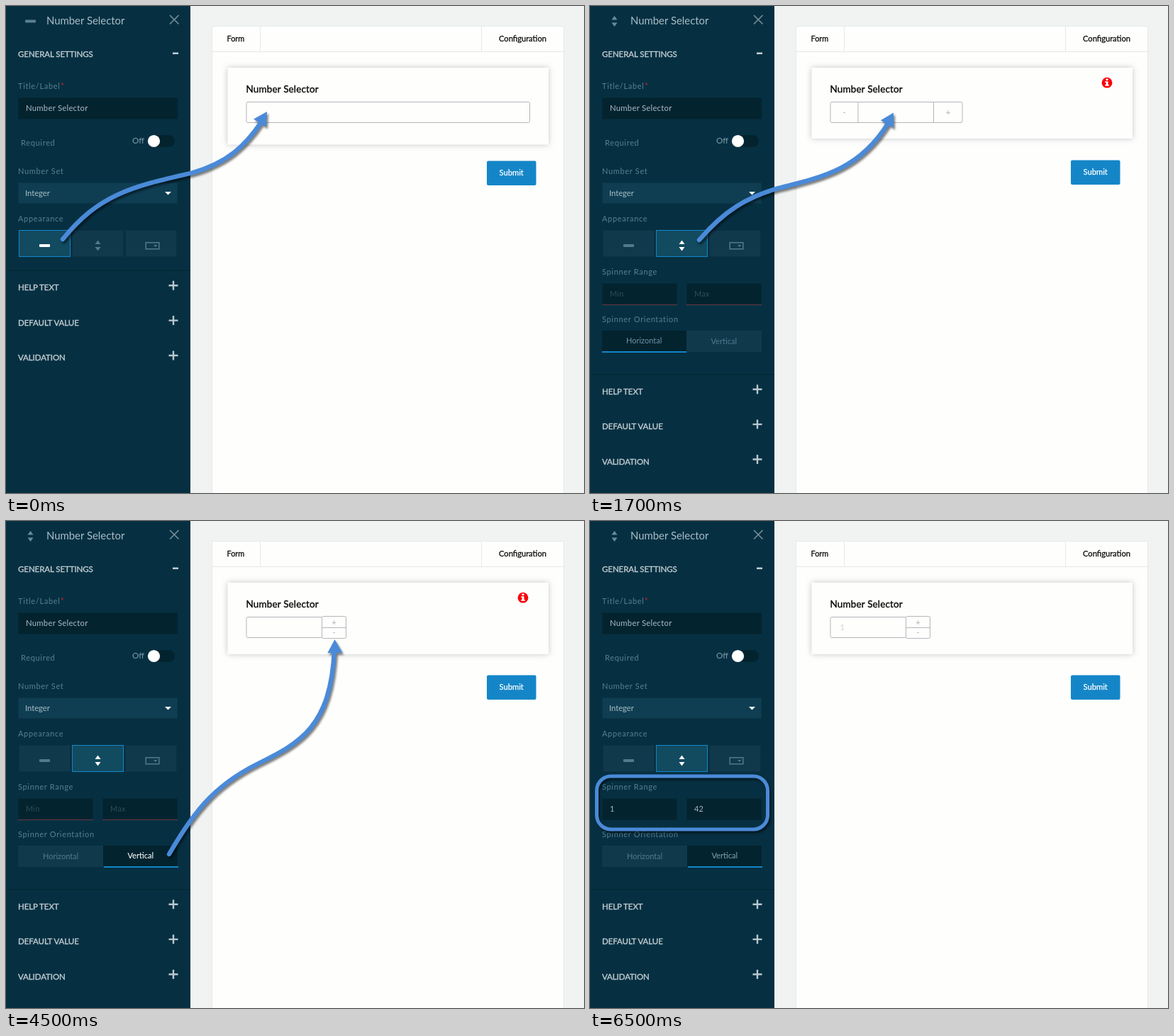
An HTML page that plays this animation: 815x687 px, repeating every 8 s.

```html
<!DOCTYPE html>
<html lang="en">
<head>
<meta charset="utf-8">
<title>Number Selector settings</title>
<style>
  html, body { margin: 0; width: 100%; height: 100%; overflow: hidden; background: #f0f3f2; }
  svg { display: block; }
  text { font-family: Lato, "Open Sans", sans-serif; white-space: pre; }
  .mark { fill: none; stroke: #4a8ad8; stroke-width: 6.4; stroke-linecap: round;
          filter: drop-shadow(2.5px 3px 1.5px rgba(0, 0, 0, .5)); }
  .mark polygon { fill: #4a8ad8; stroke: none; }
  .card { filter: drop-shadow(0 0 4px rgba(40, 60, 55, .28)); }
</style>
</head>
<body>
<svg id="stage" width="815" height="687" viewBox="0 0 815 687"></svg>
<script>
const DARK = '#03232f', SOFT = '#11394c', BLUE = '#1486c8', LABEL = '#587f91', GREY = '#b3b6b8';

const rect = (x, y, w, h, fill, more = '') =>
  `<rect x="${x}" y="${y}" width="${w}" height="${h}" fill="${fill}" ${more}/>`;
const box = (x, y, w, h, fill, line, r = 0) => rect(x, y, w, h, fill, `rx="${r}" stroke="${line}"`);
const path = (d, line, width = 1) => `<path d="${d}" fill="none" stroke="${line}" stroke-width="${width}"/>`;
const text = (x, y, s, size, fill, gap = 0, weight = 0, anchor = 'start') =>
  `<text x="${x}" y="${y}" font-size="${size}" fill="${fill}" letter-spacing="${gap}" text-anchor="${anchor}"` +
  ` stroke="${fill}" stroke-width="${weight}">${s}</text>`;
const label = (x, y, s) => text(x, y, s, 11, LABEL, .68);
const heading = (y, s) => text(17, y, s, 11.5, '#c3ced3', -.08, .35);
const triangle = (x, y, w, h, fill) => `<path d="M${x - w / 2} ${y}h${w}l${-w / 2} ${h}z" fill="${fill}"/>`;
const spinner = (x, y, fill) => triangle(x, y - 2, 8, -5.5, fill) + triangle(x, y + 2, 8, 5.5, fill);
const dash = (x, y, fill) => rect(x - 7.5, y - 2, 15, 4, fill, 'rx=".8"');
const plus = (x, y) => path(`M${x - 6.5} ${y}h13M${x} ${y - 6.5}v13`, '#b9c7ce', 2.4);
const sign = (x, y, s, size) => text(x, y, s, size, '#a9adb0', 0, 0, 'middle');

// Arrow head with its tip at x, y and its base centre dx, dy behind it
function head(x, y, dx, dy) {
  const k = 10.5 / Math.hypot(dx, dy), bx = x + dx, by = y + dy;
  return `<polygon points="${x},${y} ${bx - dy * k},${by + dx * k} ${bx + dy * k},${by - dx * k}"/>`;
}
const mark = (d, ...heads) => `<g class="mark"><path d="${d}"/>${heads.map(h => head(...h)).join('')}</g>`;

function appearance(active) {
  return [18, 93, 168].map((x, i) => {
    const on = i === active, ink = on ? '#fff' : '#527a8c';
    const icon = [
      dash(54.5, 338, ink),
      spinner(129.5, 338, ink),
      path('M197.2 333.7h18.6v9.1h-18.6z', ink, 1.5) + triangle(210.8, 337, 5, 3, ink)
    ][i];
    return box(x + .5, 316.5, 72, 37, on ? '#124a60' : SOFT, on ? BLUE : '#0c3143') + icon;
  }).join('');
}

function rangeField(x, hint, value) {
  return box(x + .5, 391.5, 105, 30, DARK, '#052836', 1) +
    (value ? '' : path(`M${x} 421.5h106`, '#6a3a42')) +
    text(x + 11, 410, value || hint, 11, value ? '#a3b8c1' : '#2f4c59', .2);
}

function orientation(vertical, ink) {
  const split = vertical ? 137 : 136, x = vertical ? 138 : 17, w = vertical ? 105 : 119;
  return rect(17, 458, split - 17, 30, vertical ? SOFT : DARK) +
    rect(split, 458, 242 - split, 30, vertical ? DARK : SOFT) +
    rect(x, 487, w, 2, BLUE) +
    text(vertical ? 52 : 51, vertical ? 476.5 : 475.5, 'Horizontal', 11, vertical ? '#507b8e' : '#6c94a6') +
    text(vertical ? 171.5 : 170.5, vertical ? 475.5 : 476.5, 'Vertical', 11, ink, 0, vertical ? .1 : 0);
}

function panel(s) {
  const shift = s.spin ? 146.5 : 0;
  return rect(0, 0, 260, 687, '#063042') +
    (s.spin ? spinner(34.5, 21.5, '#6b8b99') : dash(34.5, 21.5, '#5d8090')) +
    text(57, 26, 'Number Selector', 14.9, '#a9bdc6') +
    path('M231 13l12.5 12.5M243.5 13l-12.5 12.5', '#768d98', 1.7) +
    heading(71.5, 'GENERAL SETTINGS') + rect(235, 65.5, 8, 2.5, '#c3ced3') +
    label(17, 117, 'Title/Label') + text(77, 117, '*', 11, '#d8222c') +
    box(17.5, 129.5, 224.5, 30, DARK, '#052836', 1) +
    text(28, 148, 'Number Selector', 11.3, '#a9bdc6', .25) +
    label(21, 197, 'Required') + text(178, 194, 'Off', 11.6, '#7f9eac') +
    rect(200, 182, 38, 17, DARK, 'rx="8.5"') + '<circle cx="208.5" cy="190.5" r="8.6" fill="#fff"/>' +
    label(17, 236.5, 'Number Set') +
    box(17.5, 249.5, 224, 29, '#0f3e53', '#0b3548') +
    text(27, 268, 'Integer', 11.2, '#a9bdc6') + triangle(228.5, 262, 9, 4.6, '#fff') +
    label(17, 303.5, 'Appearance') + appearance(s.spin ? 1 : 0) +
    (s.spin ? label(17, 379, 'Spinner Range') + rangeField(17, 'Min', s.min) + rangeField(136, 'Max', s.max) +
      label(17, 445.5, 'Spinner Orientation') + orientation(s.vertical, s.ink) : '') +
    rect(0, 372.5 + shift, 260, 1.4, '#042634') +
    ['HELP TEXT', 'DEFAULT VALUE', 'VALIDATION'].map((name, i) =>
      heading(401.3 + shift + i * 49.4, name) + plus(236, 394.2 + shift + i * 49.4)).join('');
}

function field(s) {
  if (!s.spin) return box(339, 135.5, 399.5, 29, '#fefefd', GREY, 2);
  if (!s.vertical) {
    return box(339, 135.5, 186, 29, '#fefefd', GREY, 2) + path('M378 135.5v29M484.5 135.5v29', GREY) +
      sign(358.5, 154, '-', 11) + sign(505, 154, '+', 12);
  }
  return box(339, 135.5, 107, 29, '#fefefd', GREY, 2) + box(445.5, 134.5, 34, 31, '#fefefd', GREY, 2) +
    path('M445.5 150.5h34', GREY) + sign(462.5, 146.5, '+', 11) + sign(462.5, 161, '-', 11) +
    (s.min ? text(352.5, 154, s.min, 11.5, '#ced6e0') : '');
}

const alertIcon = '<circle cx="729" cy="108.2" r="7.4" fill="#fb0007"/>' +
  '<path d="M727.5 102.6h3v2.4h-3zM726.3 106.3h4.2v4.8h1.3v1.7h-5.5v-1.7h1.3v-3.1h-1.3z" fill="#fff"/>';

function form(s) {
  const bottom = s.spin ? (s.vertical ? 188 : 187) : 195.5, top = s.spin ? 217.5 : 218.5;
  return box(290.5, 28.5, 496, 670, '#fefefd', '#e6e9e8') +
    path('M290.5 64.5h496M358.5 28.5v36M670.5 28.5v36', '#e6e9e8') +
    text(311.5, 50, 'Form', 10.9, '#111', 0, .3) + text(695, 50, 'Configuration', 11.15, '#111', 0, .3) +
    rect(312.5, 87, 452.5, bottom - 87, '#fefefd', 'class="card"') +
    text(338.5, 122, 'Number Selector', 13.5, '#080808', .15, .35) +
    field(s) + (s.alert ? alertIcon : '') +
    rect(678, top, 69.5, 34.5, BLUE, 'rx="2"') +
    text(695.5, top + 20.8, 'Submit', 11.2, '#fff', 0, .25);
}

const scenes = [
  { end: 500, mark: mark('M80 329C130 267 175 255 262 235.5C313 221 338 196 359 165', [368, 149, -10, 16]) },
  { end: 2500, spin: true, alert: true, ink: '#507b8e',
    mark: mark('M154 330C190 288 222 270 262 258C330 241 380 230 420 166', [428, 150.5, -9, 16]) },
  { end: 4500, spin: true, alert: true, ink: '#507b8e',
    mark: mark('M119 474C160 400 205 372 262 348.5C342 320 429 304 429 204M369 173C385 211 477 211 495 173',
      [360, 158, 8.5, 17], [504, 158, -8.5, 17]) },
  { end: 6500, spin: true, alert: true, vertical: true, ink: '#fff',
    mark: mark('M230 470C262 415 290 375 354 343C415 313 458 290 463 182', [463.5, 167, .3, 19]) },
  { end: 8000, spin: true, vertical: true, ink: '#7d9eae', min: '1', max: '42',
    mark: rect(9.5, 360, 241, 75, 'none', 'rx="20" class="mark" style="stroke-width:5"') }
];

const stage = document.getElementById('stage');
const start = performance.now();
let shown;

function tick() {
  const time = (performance.now() - start) % 8000;
  const scene = scenes.find(s => time < s.end);
  if (scene !== shown) {
    shown = scene;
    stage.innerHTML = rect(260, 0, 555, 687, '#f0f3f2') + form(scene) + panel(scene) + scene.mark;
  }
  requestAnimationFrame(tick);
}
tick();
</script>
</body>
</html>
```
